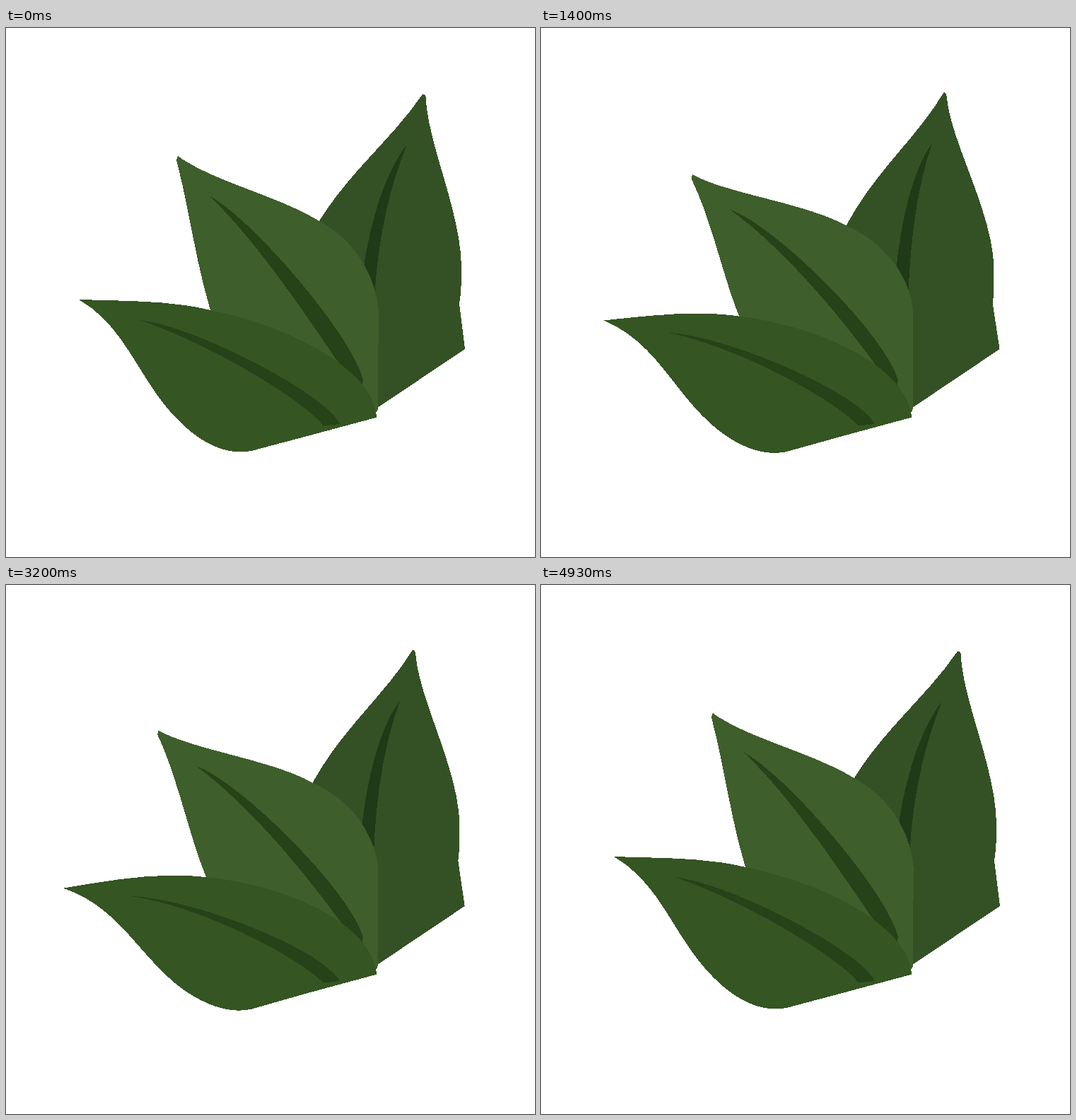
An HTML page that plays this animation: 748 px wide and 748 px high, repeating every 4.99 s.

```html
<!DOCTYPE html>
<html lang="en">
<head>
<meta charset="utf-8">
<title>Swaying leaves</title>
<style>
  html, body { margin: 0; width: 100%; height: 100%; overflow: hidden; background: #fff; }
  svg { display: block; width: 100vw; height: 100vh; }
</style>
</head>
<body>
<svg id="stage" viewBox="0 0 748 748" shape-rendering="crispEdges"></svg>
<script>
const LOOP = 4990, CYCLE = 5000, STEP = 200 / 3, LAST = 74;

// peak: time of the furthest bend; reach: bend at which the second pose holds
const leaves = [
  {
    peak: 1870, reach: 0.924,
    parts: [
      ['#345126',
        'M589 93.5C544 161 472 213 428 299L525 537L649 454L641 390C643 378 644 365 644 345C646 265 596 165 593.5 97L591.5 93.5Z',
        'M567.5 91C526 162 461 210 421 300L525 537L648.5 454L638.5 390C640 378 640 366 640 350C644 268 577 163 571.5 95L570 91.5Z'],
      ['#1f3a16',
        'M567 165C535 205 513 280 505 345L521 385C524 310 540 230 567 165Z',
        'M552 162C523 203 507 280 501 350L519 388C521 310 529 230 552 162Z']
    ]
  },
  {
    peak: 2130, reach: 0.975,
    parts: [
      ['#3e5e2b',
        'M243 181C292 217 382 236 443 273C492 300 522 347 527 400L525.5 541L522 544L400 530C330 500 300 440 289 399C268 330 258 250 241 187Z',
        'M204 216C258 242 369 250 431 283C486 308 520 350 526 400L525.5 541L522 544L400 530C322 500 298 455 279 415C254 362 238 285 203 222Z'],
      ['#264218',
        'M287 237C347 268 490 435 505 498L503 507L490 500L472 476C434 421 354 299 287 237Z',
        'M260 263C326 283 485 432 505 498L503 507L490 500L473 476C430 418 349 323 260 263Z']
    ]
  },
  {
    peak: 2600, reach: 0.983,
    parts: [
      ['#355523',
        'M103 384C165 386 235 385 289 399C390 419 510 475 523 543L524.5 550.5C465 566.5 406 582.5 347 598C320 603 284 596 243 554C187 498 171 423 103 384Z',
        'M77.5 436C150 422 215 408 285 416C390 424 509 474 523 543L524.5 550.5C465 566.5 405 582.5 347 600C318 607 280 596 240 566C183 520 155 460 77.5 436Z'],
      ['#264218',
        'M189 413C270 422 454 519 472 560L449 562.5C418 524 287 446 189 413Z',
        'M171 444C262 446 444 513 472 560L449 562.5C408 524 272 454 171 444Z']
    ]
  }
];

const stage = document.getElementById('stage');
const NUMBER = /[\d.]+/g;

for (const leaf of leaves) {
  leaf.shapes = leaf.parts.map(([fill, rest, bent]) => {
    const el = document.createElementNS('http://www.w3.org/2000/svg', 'path');
    el.setAttribute('fill', fill);
    stage.append(el);
    return { el, rest, bent: bent.match(NUMBER).map(Number) };
  });
}

const ease = s => s * s * (3 - 2 * s);

const bendAt = (t, peak) => ease(t < peak ? t / peak : (CYCLE - t) / (CYCLE - peak));

function mix(rest, bent, k) {
  let i = 0;
  return rest.replace(NUMBER, n => (+n + (bent[i++] - n) * k).toFixed(2));
}

function draw(ms) {
  const t = Math.min(LAST, Math.floor((ms + 5) / STEP)) * STEP;
  for (const { peak, reach, shapes } of leaves) {
    const k = bendAt(t, peak) / reach;
    for (const { el, rest, bent } of shapes) el.setAttribute('d', mix(rest, bent, k));
  }
}

const start = performance.now();

function tick() {
  draw((performance.now() - start) % LOOP);
  requestAnimationFrame(tick);
}
tick();
</script>
</body>
</html>
```
